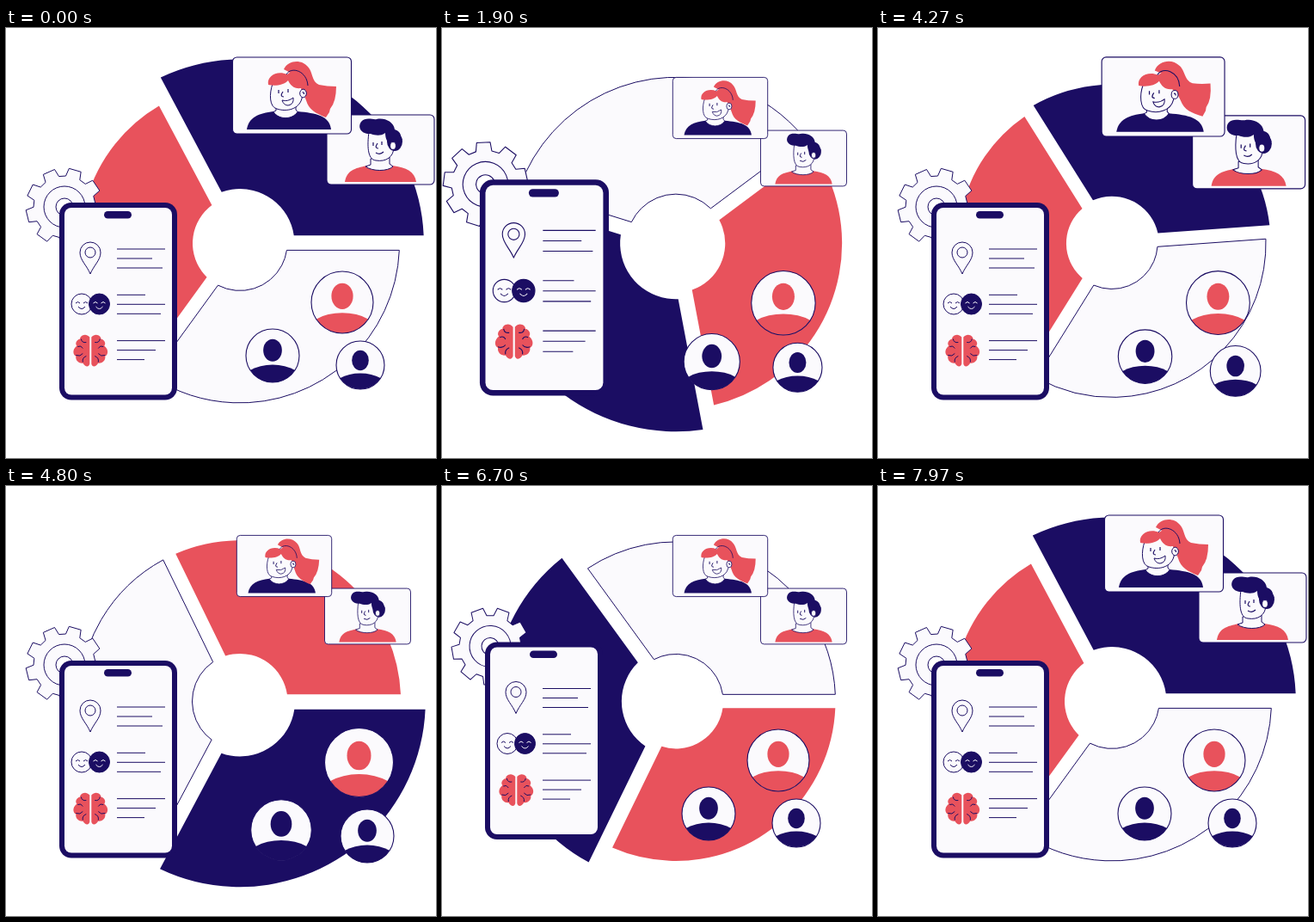
Animation, 500 px wide and 500 px high, one loop 8010 ms. Source, as an HTML page with a canvas:

```html
<!DOCTYPE html>
<html lang="en">
<head>
<meta charset="utf-8">
<title>Team wheel</title>
<style>
html, body { margin: 0; width: 100%; height: 100%; overflow: hidden; background: #fff; }
canvas { display: block; width: 500px; height: 500px; }
</style>
</head>
<body>
<canvas id="stage" width="500" height="500"></canvas>
<script>
const ctx = document.getElementById('stage').getContext('2d');
const NAVY = '#1b0d63', RED = '#e8525c', PALE = '#fbfafd';
const CYCLE = 4005, TICKS = 120, RAD = Math.PI / 180, TAU = Math.PI * 2;
ctx.lineJoin = 'round';

// Easing
const ramp = (t, from, to) => Math.max(0, Math.min(1, (t - from) / (to - from)));
const smooth = k => k * k * (3 - 2 * k);
const easeOut = k => 1 - (1 - k) ** 3;
const easeInOut = k => k < .5 ? 4 * k ** 3 : 1 - 4 * (1 - k) ** 3;
const bump = k => Math.sin(Math.PI * k);

// Drawing
function paint(path, fill, stroke, width = 1) {
  if (fill) { ctx.fillStyle = fill; ctx.fill(path); }
  if (stroke) { ctx.strokeStyle = stroke; ctx.lineWidth = width; ctx.stroke(path); }
}
const shape = (d, fill, stroke, width) => paint(new Path2D(d), fill, stroke, width);

function oval(x, y, rx, ry, fill, stroke, width) {
  const p = new Path2D();
  p.ellipse(x, y, rx, ry, 0, 0, TAU);
  paint(p, fill, stroke, width);
}
function box(x, y, w, h, r, fill, stroke, width) {
  const p = new Path2D();
  p.roundRect(x, y, w, h, r);
  paint(p, fill, stroke, width);
}
// Draws around a pivot that is moved, scaled and turned.
function place(x, y, dx, dy, scale, turn, draw) {
  ctx.save();
  ctx.translate(x + dx, y + dy);
  ctx.scale(scale, scale);
  ctx.rotate(turn * RAD);
  ctx.translate(-x, -y);
  draw();
  ctx.restore();
}

// Wheel: in each stage one slice moves past the right-hand edge.
const SLICES = [
  { span: 118, color: NAVY, start: 0 },
  { span: 116, color: RED, start: 40 },
  { span: 126, color: PALE, start: 79 }
];

function turnOf(p, span) {
  const windUp = 4.2;
  return (span + windUp) * easeInOut(ramp(p, 7, 24.3)) - windUp * smooth(ramp(p, 1.5, 7));
}

function slice(end, span, color, scale) {
  const outer = 185.5 * scale, inner = 55 * scale, gap = 8 * scale;
  const o = Math.asin(gap / outer), i = Math.asin(gap / inner);
  const a = (end - span) * RAD, b = end * RAD;
  const p = new Path2D();
  p.arc(272, 250.4, outer, a + o, b - o);
  p.arc(272, 250.4, inner, b - i, a + i, true);
  p.closePath();
  paint(p, color, color === PALE && NAVY);
}

function wheel(t) {
  const p = t - SLICES.findLast(s => s.start <= t).start;
  const size = 1 - .038 * ramp(p, 2, 7.6) + .088 * ramp(p, 7.6, 18) - .05 * smooth(ramp(p, 18, 26));
  const boost = 1.153 - .153 * (ramp(p, 1.5, 9.6) - ramp(p, 10, 18));
  let end = SLICES.reduce((sum, s) => sum + turnOf(t - s.start, s.span), 0);
  for (const { span, color } of SLICES) {
    slice(end, span, color, color === NAVY ? size * boost : size);
    end -= span;
  }
}

// Round portraits: rest position, then shift and growth while highlighted
const PORTRAITS = [
  { x: 391, y: 319, r: 36, dx: 19.5, dy: 2.5, grow: 4, color: RED, delay: 6.5 },
  { x: 310, y: 381, r: 31, dx: 10, dy: 19, grow: 4.3, color: NAVY, delay: 7.6 },
  { x: 412, y: 392, r: 28, dx: 8, dy: 15, grow: 3, color: NAVY, delay: 5 }
];

function portrait({ x, y, r, dx, dy, grow, color, delay }, t) {
  const k = ramp(t, delay, delay + 6.5) - ramp(t, 50, 53.5 + delay);
  const cx = x + dx * k, cy = y + dy * k, R = r + grow * k;
  const disc = new Path2D();
  disc.arc(cx, cy, R, 0, TAU);
  paint(disc, PALE);
  ctx.save();
  ctx.clip(disc);
  oval(cx, cy - R * .2, R * .35, R * .42, color);
  oval(cx, cy + R * 1.02, R * 1.18, R * .68, color);
  ctx.restore();
  paint(disc, null, NAVY, 1.1);
}

// Phone and gear
function gear() {
  const p = new Path2D(), teeth = 9, step = 360 / teeth;
  for (let n = 0; n < teeth; n++)
    for (const [off, r] of [[-.34, 36], [-.23, 45], [.23, 45], [.34, 36]]) {
      const a = ((n + off) * step - 114) * RAD;
      p.lineTo(68 + r * Math.cos(a), 208 + r * Math.sin(a));
    }
  p.closePath();
  paint(p, PALE, NAVY);
  oval(68, 208, 24, 24, null, NAVY);
  oval(68, 208, 10, 10, '#fff', NAVY);
}

function smiley(x, fill, ink) {
  oval(x, 321, 12, 12, fill, NAVY);
  shape(`M${x - 7} 320q2.5 -3 5 0m4 0q2.5 -3 5 0M${x - 4} 324q4 5 8 0`, null, ink);
}

function brain() {
  for (const side of [-1, 1]) {
    ctx.save();
    ctx.translate(98.300, 374.5);
    ctx.scale(side, 1);
    shape('M1 -15C6 -21 13 -16 12 -13C17 -12 18 -7 16 -5C22 0 20 6 17 7C18 13 12 16 9 15C6 20 2 20 1 16Z', RED);
    shape('M11 -13q-1 5 -6 4M15 -4q-4 -2 -6 2M17 6q-5 2 -8 -2M9 14q1 -5 -4 -7', null, NAVY);
    ctx.restore();
  }
}

function phoneFace() {
  box(62, 203, 137, 229.5, 14, NAVY);
  box(68, 209, 125, 217.5, 8, PALE);
  box(114, 213, 32, 8.5, 4.3, NAVY);
  shape('M98 286C94 276 86 270 86 261A12 12 0 0 1 110 261C110 270 102 276 98 286Z', null, NAVY);
  oval(98, 261, 6, 6, null, NAVY);
  smiley(88, PALE, NAVY);
  smiley(108.5, NAVY, PALE);
  brain();
  [[56, 41, 53], [33, 56, 51], [56, 45, 32]].forEach((group, g) =>
    group.forEach((length, row) => shape(`M129 ${257 + 53.3 * g + 11 * row}h${length}`, null, NAVY)));
}

function phone(t) {
  const out = ramp(t, 47, 62), back = ramp(t, 83.5, 95);
  const across = easeOut(out) - back ** 3, up = smooth(out) - smooth(back);
  const scale = 1 + .097 * bump(out * out) + .045 * bump(back * back);
  place(130.5, 317.5, -12 * across, -21.5 * up, scale, 0, () => {
    place(68, 208, 0, 0, 1, 4 * across + 20 * bump(out), gear);
    phoneFace();
  });
}

// Video cards
function woman(t) {
  const lean = bump(ramp(t, 84, 97));
  const sway = 5 * Math.sin(t * .589) * (1 - ramp(t, 8, 33)) - 25 * lean;
  place(0, 0, -9 * lean, 0, 1, 0, () =>
    shape('M280 118C282 104 294 99 311 97H339C361 99 376 102 378 118Z', NAVY));
  place(0, 0, -15 * lean, 0, 1, 0, () => {
    place(335, 48, 0, 0, 1 + .12 * lean, sway, () =>
      shape('M323 48C328 37 344 36 351 45C357 51 355 62 364 66Q373 68 384 68Q384 86 377 94L376 98L372 104C360 99 352 95 349 84L338 56Z', RED));
    shape('M314 88V96L311 97.500C317 107 333 107 339 97.500L337 95V86Z', PALE, NAVY);
    shape('M310 65C306 76 306 92 315 94C327 98 341 94 344 82L347 68L338 56L316 56Z', PALE, NAVY);
    shape('M305 66C303 56 315 49 327 54C336 46 352 53 351 68Q351 75 346 79L343 70C335 71 331 67 328 61C324 66 313 68 305 66Z', RED);
    shape('M326 54C332 44 350 50 351 67', null, NAVY);
    oval(345.5, 76, 3.8, 4.8, PALE, NAVY);
    shape('M317 72v4M328 71v4M322 74q-4 6 1 6M344.5 75q2 -1 2 2', null, NAVY, 1.2);
    shape('M321 84Q328 86 334 81Q335 89 328 90Q323 90 321 84Z', '#fff', NAVY);
  });
}

function man() {
  shape('M394 179C396 166 405 163 420 160H449C466 162 475 167 477 179Z', RED);
  shape('M424 152V159L418 161C426 167 444 167 450 161L446 158V150Z', PALE, NAVY);
  shape('M422 121C420 136 420 153 430 154C442 156 451 150 451 138L448 121Z', PALE, NAVY);
  oval(452, 132, 9, 11, NAVY);
  shape('M424 123C414 124 408 116 413 109C418 103 427 107 431 106C440 104 451 109 452 118C461 121 458 127 461 130L447 136C442 132 441 126 441 122C436 126 429 125 424 123Z', NAVY);
  oval(450, 137, 3.4, 4.4, PALE, NAVY);
  shape('M427 133v4M437 132v4M432 134q-4 6 1 6M430 145q5 3 9 -1', null, NAVY, 1.2);
}

// The card leaves its highlighted place early by the lag and returns late by it.
function card(t, x, y, w, h, dx, dy, lag, person) {
  const out = ramp(t, 6 - lag, 16 - lag), back = ramp(t, 86 + lag, 94 + lag);
  const away = smooth(out) - smooth(back);
  const size = 1.25 - .25 * (out ** 3 - easeOut(back)) + .08 * bump(out) + .03 * bump(back);
  place(x, y, dx * away, dy * away, size / 1.25, 0, () => {
    box(x - w / 2, y - h / 2, w, h, 5, PALE, NAVY, 1.1);
    person(t);
  });
}

const begin = performance.now();
function frame() {
  const t = (performance.now() - begin) % CYCLE / CYCLE * TICKS;
  ctx.fillStyle = '#fff';
  ctx.fillRect(0, 0, 500, 500);
  wheel(t);
  phone(t);
  card(t, 435.5, 141.5, 125, 81, -15, 10, 1.6, man);
  card(t, 332.5, 78.5, 138, 89, -9, 14.5, 0, woman);
  for (const p of PORTRAITS) portrait(p, t);
  requestAnimationFrame(frame);
}
frame();
</script>
</body>
</html>
```
